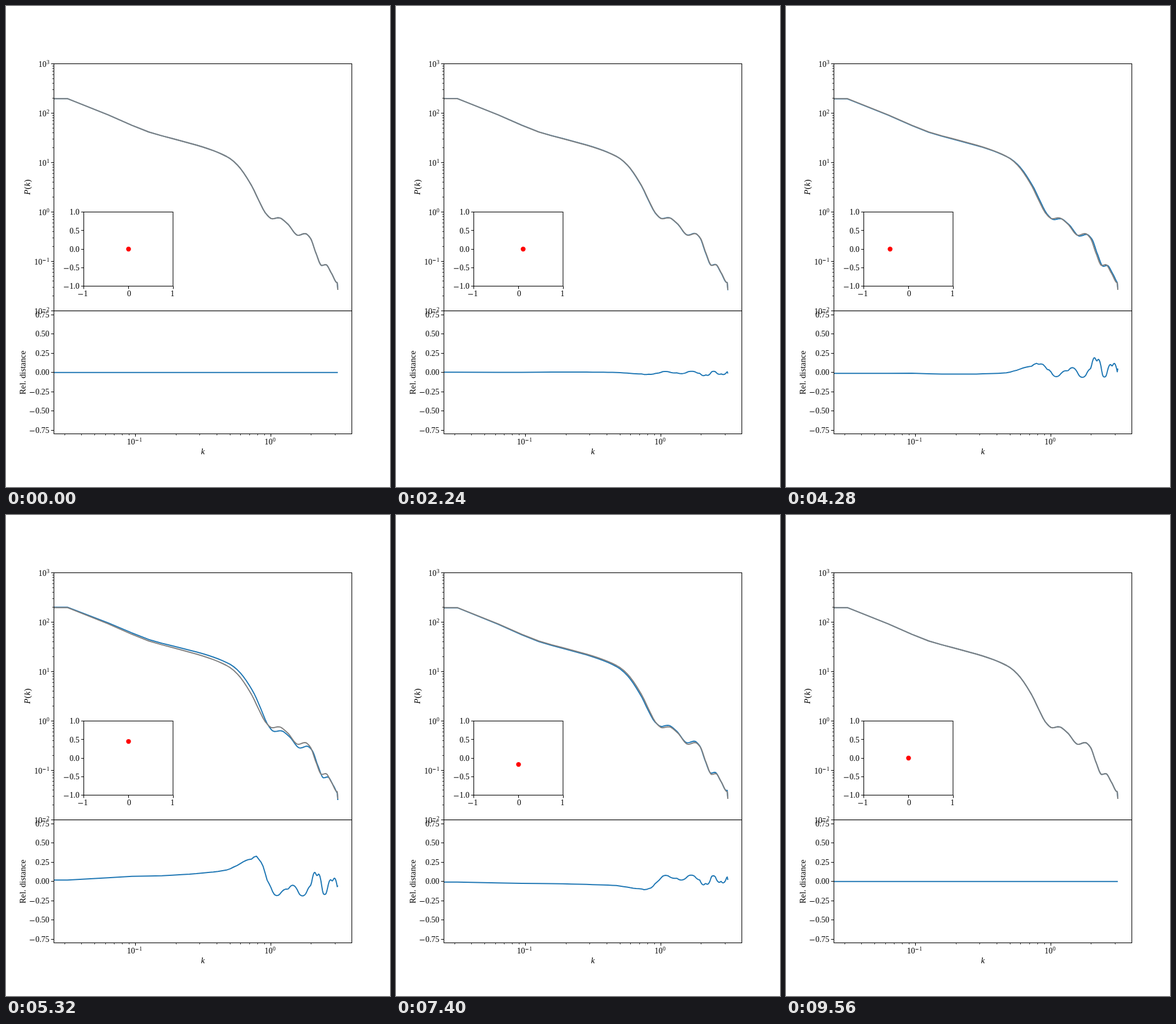
These frames come from a looping animation (669 px wide and 837 px high, 9.6 s). An HTML page with a canvas:

```html
<!DOCTYPE html>
<html>
<head>
<meta charset="utf-8">
<style>
html, body { margin: 0; width: 100%; height: 100%; overflow: hidden; background: #fff; }
canvas { display: block; }
</style>
</head>
<body>
<canvas id="stage" width="669" height="837"></canvas>
<script>
const ctx = document.getElementById('stage').getContext('2d');
const SERIF = '"Liberation Serif", serif';
const LEFT = 83.5, RIGHT = 602.5, TOP = 100.5, MID = 530.5, BOTTOM = 744.5;
const ZERO = 637.8, UNIT = 134.2, DECADE = 85.94;
const INSET = { x: 136, y: 358.5, w: 155.5, h: 129 };

const kx = k => 461 + 235.6 * Math.log10(k);
const powerY = exp => 530.2 - (exp + 2) * DECADE;

// Monotone cubic through key points
function smooth(points) {
  const slopes = points.slice(1).map(([x, y], i) => (y - points[i][1]) / (x - points[i][0]));
  const tangents = points.map((_, i) => {
    const a = slopes[i - 1] ?? slopes[0], b = slopes[i] ?? a;
    return a * b <= 0 ? 0 : 2 * a * b / (a + b);
  });
  return x => {
    let i = 0;
    while (i < slopes.length - 1 && x > points[i + 1][0]) i++;
    const [x0, y0] = points[i], [x1, y1] = points[i + 1];
    const h = x1 - x0, t = (x - x0) / h, u = 1 - t;
    return u * u * ((1 + 2 * t) * y0 + t * h * tangents[i]) +
           t * t * ((3 - 2 * t) * y1 - u * h * tangents[i + 1]);
  };
}

const spectrum = smooth([
  [90, 154.5], [178, 189.5], [219, 207.5], [248, 219], [306, 235], [345, 246],
  [386, 262.8], [403, 276.5], [428, 312.8], [440, 337.5], [453, 361.5], [464, 370.3],
  [475, 368.5], [490, 378.5], [509, 399], [521, 396], [530, 403.5], [540, 430],
  [550, 451.5], [557, 450], [567, 465], [577, 481.5], [600, 481]
]);

// Wavenumbers are multiples of pi / 100
const grid = Array.from({ length: 100 }, (_, i) => kx((i + 1) * Math.PI / 100));

// Each parameter slides the spectrum along k and lifts it
const parameters = {
  x: { slide: v => 6 * v - 0.6 * v * v, lift: () => 3.5 },
  y: { slide: v => -7.5 * v, lift: x => 0.033 * (x - 150) - 26.5 / (1 + Math.exp((451 - x) / 6)) }
};

function curve(axis, v) {
  const { slide, lift } = parameters[axis];
  const ys = grid.map(x => spectrum(x + slide(v)) - v * lift(x));
  ys[ys.length - 1] = 494 + 4.5 * v;
  return ys;
}

const base = curve('x', 0);

function line(x1, y1, x2, y2) {
  ctx.beginPath();
  ctx.moveTo(x1, y1);
  ctx.lineTo(x2, y2);
  ctx.stroke();
}

const snap = v => Math.floor(v) + 0.5;
const tickX = (x, y, size) => line(snap(x), y, snap(x), y + size);
const tickY = (x, y, size) => line(x, snap(y), x - size, snap(y));

function text(str, x, y, size = 13.9, style = '') {
  ctx.font = `${style} ${size}px ${SERIF}`;
  ctx.fillText(str, x, y);
  return ctx.measureText(str).width;
}

// Number with a wide minus sign, ending at the right edge
function number(str, right, y, size = 13.9) {
  const digits = str.replace('-', '');
  ctx.textAlign = 'right';
  const w = text(digits, right, y, size);
  if (digits === str) return w;
  const sign = size * 0.74;
  ctx.fillRect(right - w - sign + 0.5, y - size * 0.27, sign - 2, 1);
  return w + sign;
}

function power(exp, right, y) {
  const w = number(String(exp), right, y - 5, 9.7);
  number('10', right - w - 0.3, y);
}

// Upward text; letters of a formula are italic
function vertical(str, x, y, size, formula) {
  ctx.save();
  ctx.translate(x, y);
  ctx.rotate(-Math.PI / 2);
  ctx.textAlign = 'left';
  let offset = 0;
  for (const part of formula ? str : [str])
    offset += text(part, offset, 0, size, formula && /\w/.test(part) ? 'italic' : '') + 0.5;
  ctx.restore();
}

function drawAxes() {
  ctx.strokeStyle = ctx.fillStyle = '#000';
  ctx.lineWidth = 1.1;
  ctx.strokeRect(LEFT, TOP, RIGHT - LEFT, MID - TOP);
  ctx.strokeRect(LEFT, MID, RIGHT - LEFT, BOTTOM - MID);
  ctx.strokeRect(INSET.x - 0.5, INSET.y, INSET.w, INSET.h);

  for (let e = -2; e <= 3; e++) {
    tickY(LEFT, powerY(e), 4.9);
    power(e, 75.5, powerY(e) + 5.5);
  }
  for (let v = -0.75; v <= 0.75; v += 0.25) {
    const y = ZERO - v * UNIT;
    tickY(LEFT, y, 4.9);
    number(v.toFixed(2), 75.5, y + 4.4);
  }
  tickX(kx(0.1), BOTTOM, 4.9);
  tickX(kx(1), BOTTOM, 4.9);
  power(-1, 237, 763);
  power(0, 469.5, 763);

  for (let i = 0; i < 5; i++) {
    const y = INSET.y + i * INSET.h / 4;
    tickY(INSET.x, y, 4.9);
    number((1 - i / 2).toFixed(1), 128, y + 4.8);
  }
  for (let v = -1; v <= 1; v++) {
    tickX(213.3 + v * INSET.w / 2, INSET.y + INSET.h, 4.9);
    number(String(v), 218 + v * 75.5, 505);
  }

  ctx.lineWidth = 0.8;
  for (let d = 2; d <= 9; d++) {
    for (let e = -2; e < 3; e++) tickY(LEFT, powerY(e + Math.log10(d)), 2.8);
    for (const k of [d / 100, d / 10, d])
      if (k > 0.0253 && k < 3.9) tickX(kx(k), BOTTOM, 2.8);
  }

  ctx.textAlign = 'center';
  text('k', 343, 780, 14.5, 'italic');
  vertical('Rel. distance', 34, 676, 14.8, false);
  vertical('P(k)', 41.5, 328.5, 14.6, true);
}

function clipped(x, y, w, h, draw) {
  ctx.save();
  ctx.beginPath();
  ctx.rect(x, y, w, h);
  ctx.clip();
  draw();
  ctx.restore();
}

function plot(ys, color) {
  ctx.strokeStyle = color;
  ctx.lineWidth = 2;
  ctx.lineJoin = 'round';
  ctx.beginPath();
  ctx.moveTo(60, ys[0]);
  ys.forEach((y, i) => ctx.lineTo(grid[i], y));
  ctx.stroke();
}

// Each parameter runs 0, 1, 0, -1, 0 in four runs of 30 steps
function sweep(step) {
  const t = step % 30 / 29;
  return [t, 1 - t, -t, t - 1][Math.floor(step / 30)];
}

function render(now) {
  const step = Math.floor(now / 40) % 240;
  const axis = step < 120 ? 'x' : 'y', value = sweep(step % 120);
  const ys = curve(axis, value);
  const distance = ys.map((y, i) => 10 ** ((base[i] - y) / DECADE) - 1);

  ctx.fillStyle = '#fff';
  ctx.fillRect(0, 0, 669, 837);
  clipped(LEFT, TOP, RIGHT - LEFT, MID - TOP, () => {
    plot(ys, '#1f77b4');
    plot(base, '#808080');
  });
  clipped(LEFT, MID, RIGHT - LEFT, BOTTOM - MID, () => {
    plot(distance.map(d => ZERO - d * UNIT), '#1f77b4');
  });
  clipped(INSET.x, INSET.y, INSET.w, INSET.h, () => {
    const [dx, dy] = axis === 'x' ? [value * 77.7, 0] : [0, value * 64.5];
    ctx.fillStyle = '#f00';
    ctx.beginPath();
    ctx.arc(213.5 + dx, 423 - dy, 4.2, 0, 7);
    ctx.fill();
  });
  drawAxes();
}

const start = performance.now();
function loop() {
  render(performance.now() - start);
  requestAnimationFrame(loop);
}
loop();
</script>
</body>
</html>
```
